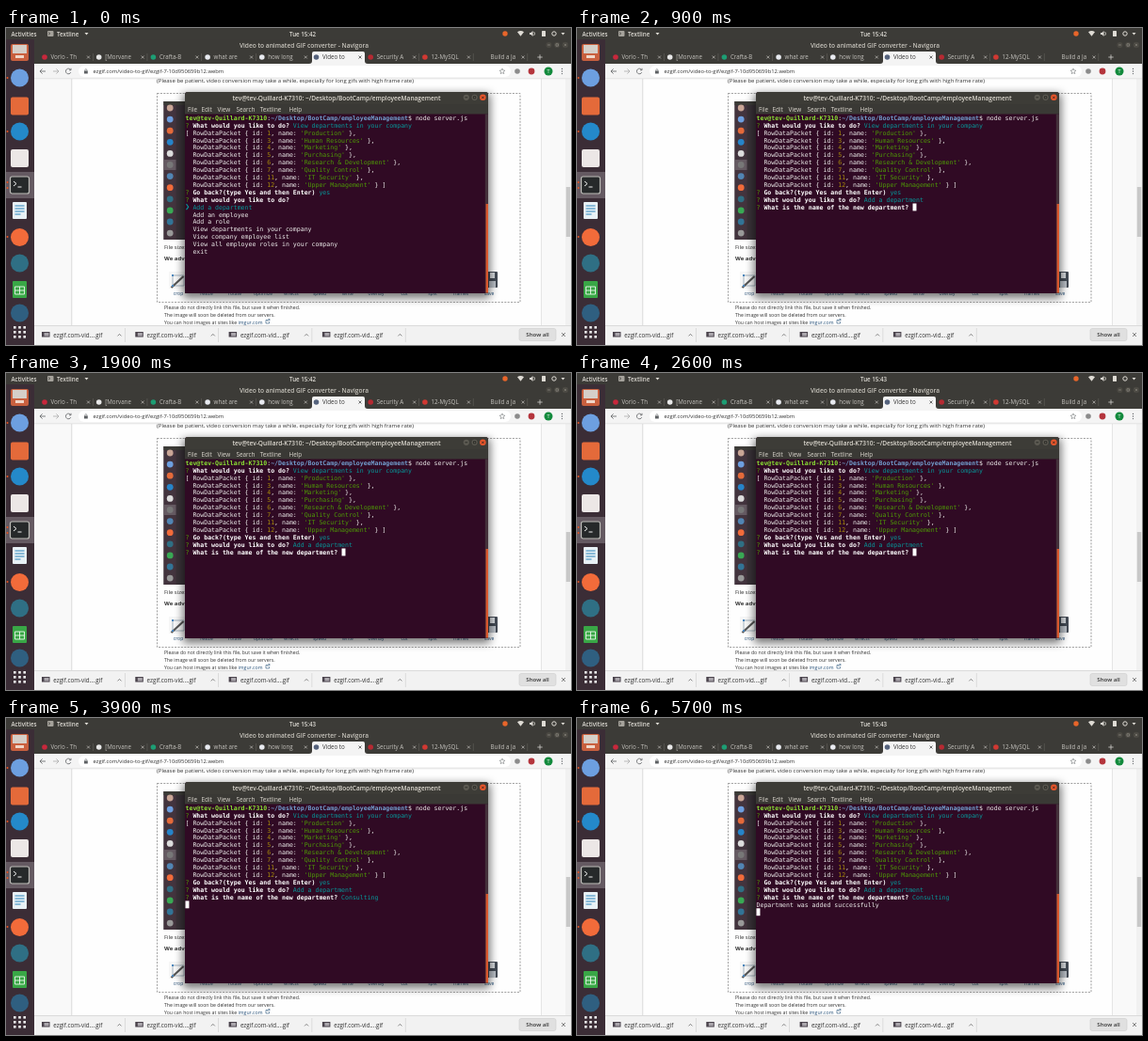
Recreate the animation shown at these times as an HTML page. Size 600 px wide and 337 px high, loop 5800 ms.

```html
<!DOCTYPE html>
<html lang="en">
<head>
<meta charset="utf-8">
<title>Adding a department</title>
<style>
  html, body { margin: 0; width: 100%; height: 100%; overflow: hidden; background: #fff; }
  svg { display: block; width: 100vw; height: 100vh; }
  text { font-family: "Open Sans", "Noto Sans", sans-serif; white-space: pre; }
  .mono text { font-family: "DejaVu Sans Mono", "Liberation Mono", monospace; font-size: 6.566px; }
  .shadow { filter: blur(5px); opacity: .55; }
</style>
</head>
<body>
<svg id="stage" viewBox="0 0 600 337" preserveAspectRatio="none"></svg>
<script>
const LOOP = 5800, STEP = 100;
const SUBMIT_MENU = 900, MINUTE = 2000, TYPE_START = 2600, KEY_TIME = 75, SUBMIT_NAME = 3900, ADDED = 4000;
const LEFT = 190.5, TOP = 97.8, CELL = 3.953, LINE = 7.9;
const CYAN = '#06989a', GREEN = '#4e9a06', YELLOW = '#a88c08', WHITE = '#eeeeec', BAR = '#3c3b37';
const USER = 'tev', HOST = 'tev-Quillard-K7310', FOLDER = '~/Desktop/BootCamp/employeeManagement', APP = 'Textline';

const esc = s => s.replace(/&/g, '&amp;').replace(/</g, '&lt;');
const rect = (x, y, w, h, fill, extra = '') =>
  `<rect x="${x}" y="${y}" width="${w}" height="${h}" fill="${fill}" ${extra}/>`;
const circle = (x, y, r, fill, extra = '') => `<circle cx="${x}" cy="${y}" r="${r}" fill="${fill}" ${extra}/>`;
const path = (d, stroke, width = 0.8) => `<path d="${d}" fill="none" stroke="${stroke}" stroke-width="${width}"/>`;
const label = (x, y, s, size, fill, extra = '') =>
  `<text x="${x}" y="${y}" font-size="${size}" fill="${fill}" ${extra}>${esc(s)}</text>`;
const cross = (x, y, r, color, width = 0.7) =>
  path(`M${x - r} ${y - r}l${2 * r} ${2 * r}m0 ${-2 * r}l${-2 * r} ${2 * r}`, color, width);
const BOLD = ' font-weight="600" ', MIDDLE = ' text-anchor="middle" ';

function windowButtons(x, y, gap, focused) {
  const [a, b, c] = [x, x + gap, x + 2 * gap];
  const base = focused ? '#5c5a52' : '#4a4842', ink = focused ? '#23221f' : '#8a877e';
  return circle(a, y, 3.1, base) + circle(b, y, 3.1, base) + circle(c, y, 3.3, focused ? '#e9562b' : base) +
    path(`M${a - 1.4} ${y}h2.8M${b - 1.2} ${y - 1.2}h2.4v2.4h-2.4z`, ink) + cross(c, y, 1.2, ink);
}

function topPanel() {
  const ink = '#dfdcd5';
  return rect(0, 0, 600, 12.2, BAR) +
    label(5.5, 8.6, 'Activities', 6.2, ink, BOLD) +
    rect(44, 3, 6.5, 6, '#a5a29b', 'rx="1"') + path('M45.2 4.6l1.4 1.3-1.4 1.3', '#292724') +
    label(54, 8.6, APP, 6.2, ink, BOLD) + `<path d="M83.5 5h4l-2 2.6z" fill="${ink}"/>` +
    circle(530, 6, 2.7, '#e8652a') +
    `<path d="M543 4.2q3.5-2.6 7 0l-3.5 4.6z" fill="${ink}"/>` +
    `<path d="M556 5h1.5l2-2v6l-2-2h-1.5z" fill="${ink}"/>` + path('M560.6 4q2 2 0 4', ink) +
    rect(569, 3, 4, 6, ink, 'rx=".6"') + circle(582, 6, 2.2, 'none', `stroke="${ink}"`) +
    `<path d="M589.5 5h4l-2 2.6z" fill="${ink}"/>`;
}

function tabs() {
  const list = [['Vorlo - Th', '#c8283c'], ['[Morvane', '#e8e8e8'], ['Crafta-B', '#1d9e74'], ['what are', '#e8eaf0'],
    ['how long', '#e8eaf0'], ['Video to', '#56637d'], ['Security A', '#b52a32'], ['12-MySQL', '#d03832'], ['Build a Ja', null]];
  return list.map(([name, color], i) => {
    const x = 37 + i * 57.7, active = i === 5;
    const ink = active ? '#333' : '#c4c2bd';
    return (active ? '<path d="M322 38q3 0 3-3v-8q0-2 2-2h52q2 0 2 2v8q0 3 3 3z" fill="#f4f4f4"/>' : '') +
      (color ? circle(x + 4, 31, 2.8, color) : '') +
      label(x + (color ? 10.5 : 16), 33.2, name, 6.2, ink) + cross(x + 50.5, 31, 1.5, ink) +
      (active || i === 4 ? '' : rect(x + 55, 27, 0.5, 8, '#6a6963'));
  }).join('') + path('M567 28.3v5.4m-2.7-2.7h5.4', '#d0cfcb');
}

function browser() {
  const grey = '#5d6063';
  return rect(30, 12, 570, 26, BAR) +
    label(316.5, 20.6, 'Video to animated GIF converter - Navigora', 6.6, '#c9c6be', BOLD + MIDDLE) +
    windowButtons(576.5, 18, 8.7, false) + tabs() +
    rect(30, 38, 570, 16, '#f4f4f4') +
    path('M42 46h-6m2.6-2.6L36 46l2.6 2.6', grey) +
    path('M50 46h6m-2.6-2.6L56 46l-2.6 2.6', '#aaa') +
    path('M68.6 44.4a2.8 2.8 0 1 0 .2 2.8M69 42.8v2h-2', grey) +
    rect(77, 40, 459, 12, '#fff', 'rx="6"') +
    rect(83, 45.5, 3.8, 3, grey) + path('M83.8 45.5v-1q1.1-1.8 2.2 0v1', grey, 0.6) +
    label(92.5, 48.4, 'ezgif.com/video-to-gif/ezgif-7-10d950659b12.webm', 5.8, '#333') +
    path('M527 43l.9 2 2 .2-1.5 1.4.4 2-1.8-1-1.8 1 .4-2-1.5-1.4 2-.2z', grey, 0.5) +
    circle(543, 46, 2.8, '#8b8b8b') + circle(558, 46, 3.4, '#b4343c') +
    circle(576, 46, 4.5, '#128a3c') + label(576, 48, 'T', 5.4, '#fff', MIDDLE) +
    [43.4, 46, 48.6].map(y => circle(590.5, y, 0.7, grey)).join('') +
    rect(30, 53.6, 570, 0.6, '#d5d5d5');
}

function thumbnail() {
  const colors = ['#c9a596', '#6d9fe0', '#e46a3a', '#2684c9', '#ddd', '#777', '#5185b3', '#f26b3a', '#2f6f84', '#39a954', '#327496', '#999'];
  return rect(167.5, 78, 30, 147, '#3a3238') + rect(167.5, 78, 13, 147, '#43343e') + rect(167.5, 78, 30, 4, BAR) +
    rect(168, 140, 12.5, 11, '#655a62') +
    colors.map((c, i) => circle(174.2, 85 + i * 12.1, 3.4, c)).join('');
}

function page() {
  const ink = '#333', link = '#28527a';
  const tools = 'crop resize rotate optimize effects speed write overlay cut split frames save'.split(' ');
  return rect(30, 54, 570, 262, '#f9f9f9') + rect(70, 54, 498, 262, '#fefefe') +
    rect(69.5, 54, 0.7, 262, '#ccc') + rect(568, 54, 0.7, 262, '#ddd') +
    rect(594, 54, 6, 262, '#f1f1f1') + rect(594.8, 169, 4.4, 53, '#c8c8c8') +
    label(160, 58.2, '(Please be patient, video conversion may take a while, especially for long gifs with high frame rate)', 6, ink) +
    rect(160.5, 69.5, 385.5, 222, 'none', 'stroke="#777" stroke-width=".7" stroke-dasharray="2 1.4"') +
    thumbnail() +
    label(168, 235.4, 'File size: 2.1MiB', 5.9, ink) + label(168, 246.5, 'We advise', 6, ink, 'font-weight="700"') +
    rect(173, 259, 350, 18, '#f6f6f6') +
    path('M177 263h12v11h-12z', '#8195a8', 0.7) + path('M175.5 276l13-12', '#555', 2.2) +
    [263, 274].map(y => rect(176, y - 1, 2, 2, '#4c86bc')).join('') +
    rect(505, 259, 17, 17, '#444b55', 'rx="1"') + rect(514, 260, 5, 6, '#d4d8dc') + rect(513, 269, 7, 7, '#b8bec5') +
    tools.map((s, i) => label(183 + i * 30, 283.7, s, 5, link, MIDDLE)).join('') +
    label(168, 299.2, 'Please do not directly link this file, but save it when finished.', 5.18, ink) +
    label(168, 306.8, 'The image will soon be deleted from our servers.', 5.18, ink) +
    `<text x="168" y="314.5" font-size="5.18" fill="${ink}">You can host images at sites like <tspan fill="${link}">imgur.com</tspan></text>` +
    path('M278 310.5h-2v3.5h3.5v-1.8m-2-.2l2.4-2.4m-1.6 0h1.6v1.6', link, 0.6);
}

function downloads() {
  const item = i => {
    const x = 38 + i * 99.3;
    return rect(x, 323, 8.5, 5.5, '#4a434c') + rect(x + 2.5, 324, 5, 3.5, '#a9a5ab') +
      label(x + 12.3, 328.5, 'ezgif.com-vid....gif', 6.25, '#333') +
      path(`M${x + 80.5} 327.4l2-2 2 2`, '#666') + rect(x + 88, 319, 0.6, 15, '#ccc');
  };
  return rect(30, 316, 570, 21, '#f2f2f2') + rect(30, 316, 570, 0.6, '#ccc') + [0, 1, 2, 3].map(item).join('') +
    rect(545, 319.5, 39, 13, '#e0e0e0', 'rx="2" stroke="#cfcfcf" stroke-width=".6"') +
    label(564.5, 328.2, 'Show all', 6.1, '#333', BOLD + MIDDLE) + cross(592, 326, 2, '#555');
}

function dock() {
  const round = [[53, '#6d9fe0'], [110, '#2489ca'], [222.5, '#f26b3a'], [250, '#2f6f84'], [303, '#2f5f80']];
  const square = [[83, '#e46a3a'], [138.5, '#ece7e6']];
  let s = rect(0, 12, 30, 325, '#3b2d36') + rect(0, 153, 30, 28, '#655a62') +
    rect(5, 17, 19, 18, '#c9603f', 'rx="2"') + rect(7, 18, 15, 9, '#d5cfc9') + rect(10, 29, 9, 3, '#f1d6c8') +
    round.map(([y, c]) => circle(14.5, y, 9.5, c)).join('') +
    square.map(([y, c]) => rect(5, y - 9.5, 19, 19, c, 'rx="2"')).join('') +
    rect(4.5, 158, 20, 18, '#26292a', 'rx="2" stroke="#bdbdb8" stroke-width="1.2"') +
    path('M8 163l3 2.5-3 2.5m4.5 1h4', '#f1f1f1', 1) +
    rect(7, 185, 15, 18, '#e8f1f6', 'rx="1"') + path('M9.5 189h10m-10 3h10m-10 3h10m-10 3h6', '#2a82b8', 1) +
    rect(7, 269, 15, 18, '#39a746', 'rx="1"') + path('M9.5 275h10v8h-10zm0 4h10m-5-4v8', '#e9f7e9', 0.9);
  for (const y of [53, 110, 164, 170, 222]) s += circle(1.5, y, 1, '#e95420');
  for (let i = 0; i < 9; i++) s += rect(8 + (i % 3) * 5.2, 317 + Math.floor(i / 3) * 5, 2.6, 2.6, '#eee');
  return s;
}

function terminalFrame() {
  const menu = [[193, 'File'], [207.5, 'Edit'], [224.5, 'View'], [244.5, 'Search'], [269.8, APP], [300.5, 'Help']];
  return rect(188, 70, 326, 217, '#000', 'class="shadow"') +
    '<path d="M190 282V71q0-3 3-3h316q3 0 3 3v211z" fill="#300a24"/>' +
    '<path d="M190 81V71q0-3 3-3h316q3 0 3 3v10z" fill="#3d3c37"/>' +
    rect(190, 81, 322, 10.5, '#3a3935') +
    label(351, 76.5, `${USER}@${HOST}: ${FOLDER}`, 6.55, '#dfdbd2', BOLD + MIDDLE) +
    windowButtons(488.8, 73.8, 8.8, true) +
    menu.map(([x, s]) => label(x, 88.7, s, 6.3, '#dfdbd2')).join('') +
    rect(508.8, 91.5, 3.2, 190.5, '#43303a') + rect(509.6, 187, 2.4, 94.5, '#d8572d');
}

const span = (s, fill = WHITE, bold = false) =>
  `<tspan fill="${fill}"${bold ? ' font-weight="700"' : ''}>${esc(s)}</tspan>`;
const ask = (question, answer = '', color = CYAN) =>
  span('? ', GREEN) + span(question + ' ', '#fff', true) + span(answer, color);
const line = (content, row) => `<text x="${LEFT}" y="${TOP + row * LINE}">${content}</text>`;
const cursor = (row, column) => rect(LEFT + column * CELL, TOP + row * LINE - 6.1, CELL, LINE, '#fff');

const departments = [[1, 'Production'], [3, 'Human Resources'], [4, 'Marketing'], [5, 'Purchasing'],
  [6, 'Research & Development'], [7, 'Quality Control'], [11, 'IT Security'], [12, 'Upper Management']];
const choices = ['Add a department', 'Add an employee', 'Add a role', 'View departments in your company',
  'View company employee list', 'View all employee roles in your company', 'exit'];
const TODO = 'What would you like to do?', ASK_NAME = 'What is the name of the new department?', NAME = 'Consulting';

const history = [
  span(`${USER}@${HOST}`, '#8ae234', true) + span(':') + span(FOLDER, '#729fcf', true) + span('$ node server.js'),
  ask(TODO, 'View departments in your company'),
  ...departments.map(([id, name], i) =>
    span(`${i ? ' ' : '['} RowDataPacket { id: `) + span(String(id), YELLOW) + span(', name: ') +
    span(`'${name}'`, GREEN) + span(i < departments.length - 1 ? ' },' : ' } ]')),
  ask('Go back?(type Yes and then Enter)', 'yes')
];

function session(t) {
  const row = history.length;
  if (t < SUBMIT_MENU) {
    return [ask(TODO), ...choices.map((c, i) => span('  ' + c, i ? WHITE : CYAN))]
      .map((s, i) => line(s, row + i)).join('') +
      path(`M${LEFT + 1} ${TOP + (row + 1) * LINE - 5.4}l2.2 3-2.2 3`, CYAN, 1.1);
  }
  const done = t >= SUBMIT_NAME;
  const typed = Math.max(0, Math.min(NAME.length, Math.floor((t - TYPE_START) / KEY_TIME)));
  const s = line(ask(TODO, choices[0]), row) +
    line(ask(ASK_NAME, NAME.slice(0, typed), done ? CYAN : WHITE), row + 1);
  if (!done) return s + cursor(row + 1, ASK_NAME.length + 3 + typed);
  if (t < ADDED) return s + cursor(row + 2, 0);
  return s + line(span('Department was added successfully'), row + 2) + cursor(row + 3, 0);
}

const stage = document.getElementById('stage');
stage.innerHTML = page() + browser() + downloads() + dock() + topPanel() +
  label(301, 8.6, '', 6.2, '#dfdcd5', BOLD + 'id="clock"') + terminalFrame() +
  `<g class="mono">${history.map(line).join('')}<g id="session"></g></g>`;
const clock = document.getElementById('clock'), live = document.getElementById('session');

let shown = -1;
function render(now) {
  const t = Math.floor((now % LOOP) / STEP) * STEP;
  if (t !== shown) {
    shown = t;
    clock.textContent = t < MINUTE ? 'Tue 15:42' : 'Tue 15:43';
    live.innerHTML = session(t);
  }
}
const start = performance.now();
function tick() {
  render(performance.now() - start);
  requestAnimationFrame(tick);
}
tick();
</script>
</body>
</html>
```
